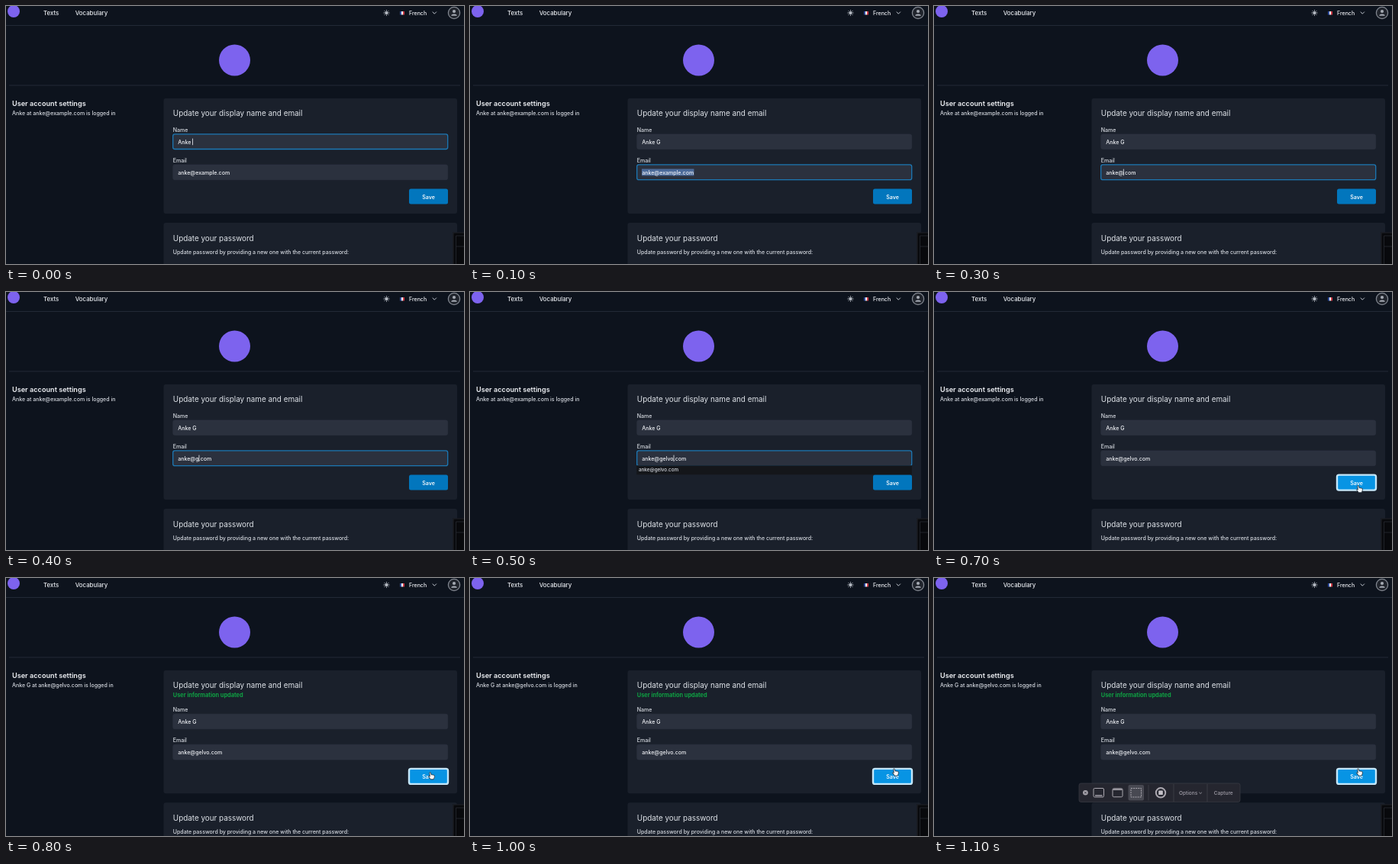
These frames come from a looping animation (600x338 px, 1200 ms). An HTML page:

```html
<!DOCTYPE html>
<html lang="en">
<head>
<meta charset="utf-8">
<title>Account settings</title>
<style>
html, body { margin: 0; width: 100%; height: 100%; overflow: hidden; background: #0d131d; }
svg { display: block; width: 600px; height: 338px; }
text { font: 500 7.03px Inter, "Open Sans", sans-serif; fill: #d8dce3; white-space: pre; }
.nav { font-size: 7.85px; fill: #e8ebf0; }
.h { font-size: 9.9px; font-weight: 400; fill: #dfe3e9; }
.strong { fill: #f0f2f6; }
.card { fill: #1a202b; }
.field { fill: #2b313e; stroke: #2e3442; stroke-width: .5; }
.focus { stroke: #1c78b4; stroke-width: 1.3; }
.line { stroke: #222936; }
.icon { fill: none; stroke: #aaa7af; }
</style>
</head>
<body>
<svg viewBox="0 0 600 338">
  <rect width="600" height="338" fill="#0d131d"/>
  <path class="line" d="M0 25.5H600M4 104H595"/>

  <circle cx="10" cy="7" r="8" fill="#7d63ee"/>
  <circle cx="299.5" cy="71" r="20.5" fill="#7d63ee"/>
  <text class="nav" x="49" y="11.8">Texts</text>
  <text class="nav" x="90.7" y="11.8">Vocabulary</text>
  <g stroke="#d3d8e0" stroke-width=".9" fill="none">
    <circle cx="498.5" cy="9" r="1.7" fill="#a9aeb7"/>
    <path id="rays"/>
    <path d="M558.7 7.6l2.6 2.6 2.6-2.6"/>
  </g>
  <path d="M516 7h2v4.4h-2z" fill="#2d4a9d"/>
  <path d="M518 7h2v4.4h-2z" fill="#f0f0f2"/>
  <path d="M520 7h2v4.4h-2z" fill="#d33c48"/>
  <text class="strong" x="528" y="11.6">French</text>
  <circle cx="587" cy="9" r="7.6" fill="#20242c" stroke="#81868f" stroke-width="1.3"/>
  <circle cx="587" cy="7" r="2.1" fill="#a5aab3"/>
  <path d="M583.2 12.8q.4-2.4 3.8-2.4t3.8 2.4z" fill="#a5aab3"/>

  <text x="8" y="130.6" style="font-size:9.15px;font-weight:600;fill:#f0f2f6">User account settings</text>
  <text id="login" x="8" y="143"/>

  <rect id="card" class="card" x="206.5" y="121" width="384.5" rx="3"/>
  <text class="h" x="218.8" y="144">Update your display name and email</text>
  <text id="notice" x="218.8" y="155.6" style="font-size:7.37px;font-weight:700;fill:#0fa043">User information updated</text>
  <g id="form">
    <text x="218.8" y="165">Name</text>
    <rect id="nameBox" class="field" x="218.7" y="167.9" width="360" height="19.6" rx="2.5"/>
    <text id="name" class="strong" x="225.2" y="180.6"/>
    <text x="218.8" y="205">Email</text>
    <rect id="emailBox" class="field" x="218.7" y="207.9" width="360" height="19.8" rx="2.5"/>
    <rect id="selection" x="225" y="213.4" height="9" fill="#4b6a99"/>
    <text id="email" class="strong" x="225.2" y="220.6"/>
    <rect id="caret" width=".8" height="8.6" fill="#eef1f5"/>
    <rect id="save" x="528" y="239.6" width="51" height="20" rx="2.5"/>
    <text x="553.5" y="252.6" text-anchor="middle" style="font-weight:600;fill:#f4f8fc">Save</text>
    <g id="popup">
      <rect x="218.3" y="227.2" width="360.5" height="12" fill="#14161a"/>
      <text x="221" y="235.2" style="font-size:6.3px">anke@gelvo.com</text>
    </g>
    <g>
      <rect class="card" x="206.5" y="284" width="384.5" height="70" rx="3"/>
      <text class="h" x="218.8" y="307.8">Update your password</text>
      <text x="218.8" y="325">Update password by providing a new one with the current password:</text>
    </g>
  </g>

  <path d="M585.5 338V296.5H600V338z" fill="#08090c"/>
  <path d="M586 338V297H600M589.5 338V301H600M589.5 315H600" fill="none" stroke="#24272d" stroke-width=".9"/>

  <g id="toolbar">
    <rect x="190" y="269" width="211" height="24.5" rx="2.5" fill="#25262f" stroke="#3c3d46" stroke-width=".7"/>
    <rect x="254.5" y="271" width="20.5" height="20.5" rx="2" fill="#484952"/>
    <path d="M281 271v20.5M314 270v23M358 270v23" stroke="#41424b" stroke-width=".8"/>
    <circle cx="198.4" cy="281.3" r="3.3" fill="#aaa7af"/>
    <path d="M197 279.9l2.8 2.8m0-2.8l-2.8 2.8" stroke="#25262f" stroke-width=".8"/>
    <rect class="icon" x="209" y="275.5" width="13.5" height="11.5" rx="1.5"/>
    <path class="icon" d="M211 285h9.5" stroke-width="1.4"/>
    <rect class="icon" x="234" y="275.8" width="13" height="11" rx="1.5"/>
    <path class="icon" d="M234.5 277.2h12" stroke-width="1.6"/>
    <rect class="icon" x="258" y="275.5" width="13.5" height="11.5" stroke="#dddce2" stroke-dasharray="2 1.1"/>
    <circle cx="297" cy="281.3" r="6.2" fill="#25262f" stroke="#aaa7af" stroke-width="2"/>
    <rect x="294.2" y="278.5" width="5.6" height="5.6" rx=".6" fill="#c4c1c8"/>
    <text x="321" y="283.7" style="font-size:6.5px;fill:#a19ea8">Options</text>
    <path class="icon" d="M347.3 280.8l1.8 1.7 1.8-1.7" stroke-width=".8"/>
    <text x="366.8" y="283.7" style="font-size:6.5px;fill:#a19ea8">Capture</text>
  </g>

  <path id="arrow" d="M582.2 273.3v8l1.8-1.6 1.3 2.9 1.4-.6-1.3-2.8h2.5z" fill="#08090c" stroke="#e8eaee" stroke-width=".8"/>
  <path id="hand" d="M-2-4q1-1.2 1.6.2l.8 2.6q1-.6 1.5.2 1-.5 1.5.3 1-.3 1.2.9l-.2 2.2-1.1 2.4h-3.8l-2.8-4q.3-1.2 1.8.2z" fill="#f4f6f8" stroke="#16222e" stroke-width=".8"/>
</svg>
<script>
const $ = id => document.getElementById(id);
const STEP = 100, STEPS = 12;
const OLD_NAME = "Anke", NEW_NAME = "Anke G";
const OLD_EMAIL = "anke@example.com", NEW_EMAIL = "anke@gelvo.com";
const domains = ["example", "example", "example", "", "g"];

$("rays").setAttribute("d", Array.from({ length: 8 }, (_, i) => {
  const c = Math.cos(i * Math.PI / 4), s = Math.sin(i * Math.PI / 4);
  return `M${498.5 + 2.7 * c} ${9 + 2.7 * s}L${498.5 + 3.9 * c} ${9 + 3.9 * s}`;
}).join(""));

const show = (id, on) => $(id).style.display = on ? "" : "none";
const set = (id, attrs) => {
  for (const key in attrs) $(id).setAttribute(key, attrs[key]);
};

function draw(step) {
  const saved = step >= 8, hover = step >= 7;
  const email = `anke@${domains[step] ?? "gelvo"}.com`;
  $("login").textContent = saved
    ? `${NEW_NAME} at ${NEW_EMAIL} is logged in`
    : `${OLD_NAME} at ${OLD_EMAIL} is logged in`;
  $("name").textContent = step ? NEW_NAME : OLD_NAME + " ";
  $("email").textContent = email;

  $("nameBox").classList.toggle("focus", step === 0);
  $("emailBox").classList.toggle("focus", step > 0 && !hover);
  set("save", {
    fill: hover ? "#0794e4" : "#0276bd",
    stroke: hover ? "#c5e7fa" : "none",
    "stroke-width": 2.4
  });

  show("selection", step === 1);
  set("selection", { width: $("email").getComputedTextLength() + .5 });
  const field = $(step ? "email" : "name");
  const chars = step ? email.length - 4 : OLD_NAME.length + 1;
  show("caret", step === 0 || step > 1 && step < 6);
  set("caret", {
    x: 225.2 + field.getSubStringLength(0, chars),
    y: step ? 213.6 : 173.6
  });

  show("popup", step === 5 || step === 6);
  show("arrow", step === 6);
  show("notice", saved);
  show("hand", hover);
  show("toolbar", step === 11);
  set("form", { transform: `translate(0 ${saved ? 10.3 : 0})` });
  set("card", { height: saved ? 161.3 : 151 });
  const handY = step === 7 ? 258 : step < 10 ? 259 : 254.3;
  set("hand", { transform: `translate(556.8 ${handY})` });
}

const start = performance.now();
let last = -1;
function tick() {
  const step = Math.floor((performance.now() - start) / STEP) % STEPS;
  if (step !== last) draw(last = step);
  requestAnimationFrame(tick);
}
tick();
</script>
</body>
</html>
```
